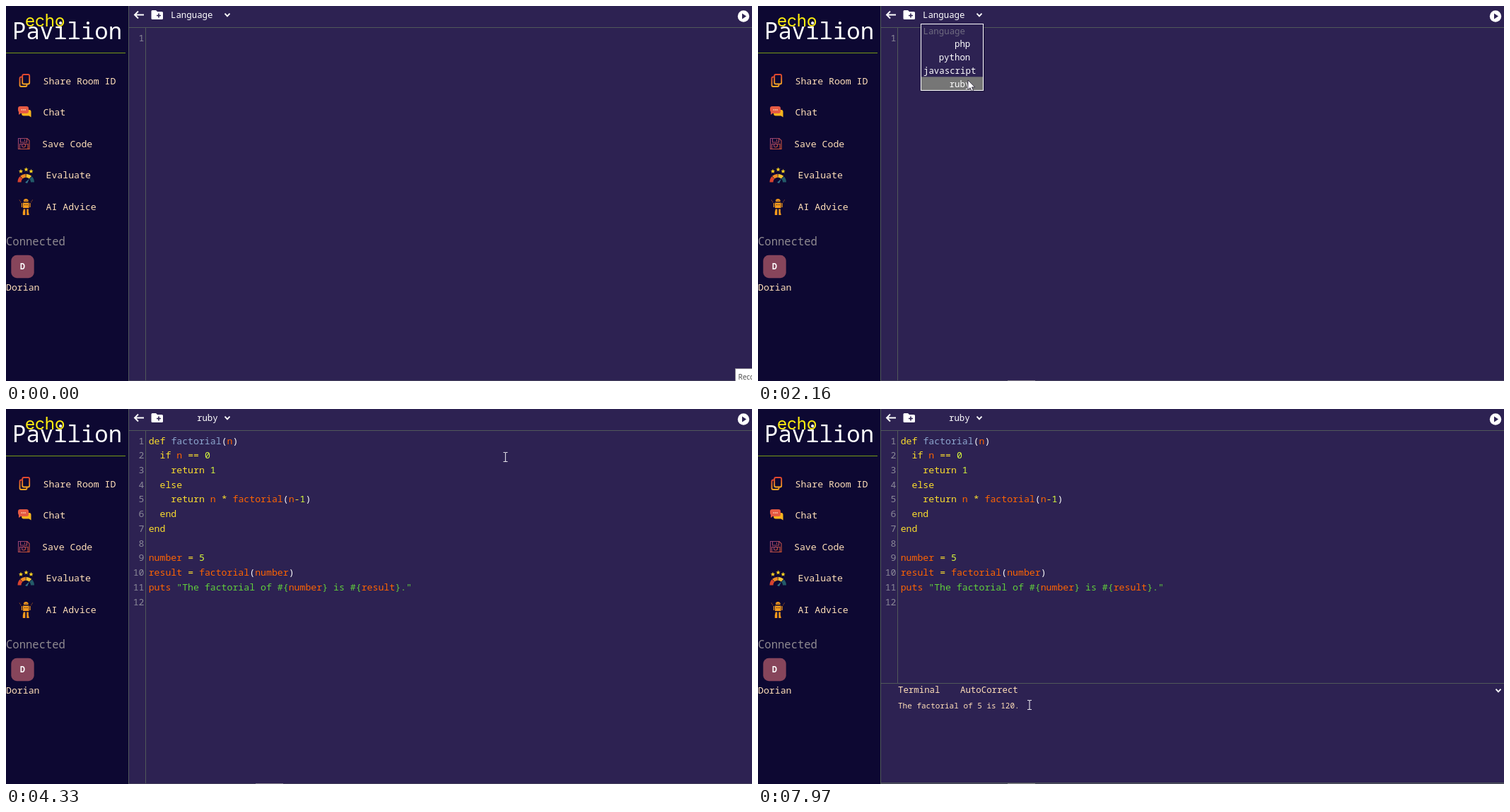
Recreate the animation shown at these times as an HTML page. Size 1055 px wide and 531 px high, loop 8 s.

```html
<!DOCTYPE html>
<html lang="en">
<head>
<meta charset="utf-8">
<title>Code room</title>
<style>
html, body { margin: 0; width: 100%; height: 100%; overflow: hidden; background: #2d2252; }
svg { display: block; width: 100vw; height: 100vh; }
text { font: 500 13.2px "Noto Sans Mono", "DejaVu Sans Mono", monospace; white-space: pre; }
.menu { fill: #ffdfb8; }
.ui { font-size: 12.4px; fill: #fff; }
.num { fill: #8b8998; text-anchor: end; }
.k { fill: #fbde2d; } .d { fill: #8da6ce; } .v { fill: #ff6400; }
.n { fill: #d8fa3c; } .s { fill: #61ce3c; } .w { fill: #f8f8f8; }
.rule { stroke: #50585a; }
</style>
</head>
<body>
<svg viewBox="0 0 1055 531" preserveAspectRatio="none">
  <defs>
    <linearGradient id="warm" x1="0" y1="0" x2="0" y2="1">
      <stop offset="0" stop-color="#e2452f"/><stop offset="1" stop-color="#f5a623"/>
    </linearGradient>
    <linearGradient id="dusk" x1="0" y1="0" x2="1" y2="1">
      <stop offset="0" stop-color="#8d3f78"/><stop offset="1" stop-color="#d2542c"/>
    </linearGradient>
    <path id="star" d="M0-3.2 .9-1.1 3.1-1 1.4.5 2 2.7 0 1.4-2 2.7-1.4.5-3.1-1-.9-1.1Z"/>
    <path id="chevron" d="M-3.5-1.8 0 1.8 3.5-1.8" fill="none" stroke="#fff" stroke-width="1.9"/>
  </defs>

  <rect width="1055" height="531" fill="#2d2252"/>
  <rect width="173" height="531" fill="#0d0832"/>
  <path class="rule" d="M173.5 0V531M174 30.5H1055"/>
  <path d="M174 530.5H1055" stroke="#45415c"/>
  <path id="gutter" class="rule"/>
  <path d="M0 66.5H169" stroke="#769a16"/>

  <text x="9" y="47" style="font-size:32.3px;font-weight:400" fill="#fff">Pavilion</text>
  <text x="27" y="29" style="font:24px Inter,sans-serif" fill="#ffee10">echo</text>

  <g fill="none" stroke="url(#warm)" stroke-width="1.8">
    <rect x="23.2" y="97" width="10" height="13.5" rx="2"/>
    <path d="M23 100.5H21.5Q19.5 100.5 19.5 102.5V112Q19.5 114 21.5 114H27.5Q29.5 114 29.5 112V111"/>
  </g>
  <path d="M23 147H33Q35.500 147 35.500 150V157.500L32.500 155.500H25Q22 155.500 22 152Z" fill="#f7b51d"/>
  <path d="M20 142H29Q32 142 32 145V149Q32 152 29 152H21L18 154V150Q17 149 17 147V145Q17 142 20 142Z" fill="#e65a43"/>
  <path d="M21.500 147H28" stroke="#fbd0b0" stroke-width="1.600" stroke-dasharray="1.6 .8"/>
  <g fill="none" stroke="url(#dusk)" stroke-width="1.1">
    <path d="M17.500 187.500H30L33 190.500V202.500H17.500ZM20.500 187.500V193H29.500V187.500M26.500 189V191.500M19.500 202V195.500H31V202"/>
    <circle cx="25" cy="197.500" r="2.500"/><path d="M22 201H28"/>
  </g>
  <g fill="#f9cf22">
    <use href="#star" x="21" y="234"/><use href="#star" x="28.500" y="231.500"/><use href="#star" x="35.500" y="234"/>
  </g>
  <g fill="none" stroke-width="5">
    <path d="M19 249.500A9.300 9.300 0 0 1 21.500 243" stroke="#d8432f"/>
    <path d="M21.800 242.700A9.300 9.300 0 0 1 27.800 240.200" stroke="#f08a24"/>
    <path d="M28.500 240.200A9.300 9.300 0 0 1 34.500 242.700" stroke="#f4c430"/>
    <path d="M35 243.100A9.300 9.300 0 0 1 37.500 249.500" stroke="#235a68"/>
  </g>
  <path d="M27 250 33 244.500 30 251Z" fill="#34758a"/>
  <g fill="#f59a1c">
    <path d="M25 277V275.500Q25 273 28.200 273T31.500 275.500V277ZM24 278.500H32.500V286H24ZM24.800 287.500H27.300V296H23.800V292ZM29.300 287.500H31.800V292L32.800 296H29.300Z"/>
    <path d="M22.500 279V285M34 279V285" stroke="#f59a1c" stroke-width="1.200"/>
    <path d="M19 274.500 21 278M37.500 274.500 35.500 278" stroke="#a8561c" stroke-dasharray="1.5 1"/>
  </g>
  <path d="M26 281.500H27.500M29 281.500H30.500M26.500 275.500H27.500M29 275.500H30" stroke="#302030" stroke-width="1.200"/>
  <g id="menu"></g>

  <text x="0" y="339" style="font-size:15.55px;font-weight:400" fill="#8f8a90">Connected</text>
  <rect x="7.300" y="352.800" width="32.400" height="32.400" rx="8" fill="#87455b"/>
  <text x="23.500" y="373" text-anchor="middle" style="font-size:11.5px;font-weight:600" fill="#fff">D</text>
  <text class="menu" x="0" y="403">Dorian</text>

  <path d="M195 12.500H182.500M187 7.500 182 12.500 187 17.500" fill="none" stroke="#fff" stroke-width="1.900"/>
  <path d="M207 6H212L214 8H220.500Q222 8 222 9.500V17.500Q222 19 220.500 19H207Q205.500 19 205.500 17.500V7.500Q205.500 6 207 6Z" fill="#fff"/>
  <path d="M216 10.500V16.500M213 13.500H219" stroke="#2d2252" stroke-width="1.600"/>
  <rect id="focus" x="228.500" y="1.500" width="91.500" height="21.500" rx="3" fill="none" stroke="#fff" stroke-width="1.200"/>
  <text id="lang" class="ui" y="17"></text>
  <use href="#chevron" x="313" y="12.500"/>
  <circle cx="1043" cy="14.500" r="8.200" fill="#fff"/>
  <path d="M1041 10.500 1047 14.500 1041 18.500Z" fill="#2d2252"/>

  <g id="code"></g>
  <text class="num" x="195.500" y="49.500">1</text>
  <path id="caret" d="M201.500 0V21" stroke="#b5b3bd"/>

  <g id="panel">
    <path class="rule" d="M174 388.500H1055M174 529.500H1055"/>
    <text class="menu" style="font-size:12.4px" x="198" y="402">Terminal</text>
    <text class="menu" style="font-size:12.4px" x="286" y="402">AutoCorrect</text>
    <text class="menu" style="font-size:11px" x="198" y="424">The factorial of 5 is 120.</text>
    <use href="#chevron" x="1047" y="398.500"/>
  </g>

  <g id="list">
    <rect x="229" y="27" width="92" height="95" fill="#1b1437" opacity=".35"/>
    <rect x="230.500" y="25.500" width="88" height="94" fill="#2d2252" stroke="#fff"/>
    <rect id="hover" x="231" width="87" height="18.700" fill="#767676"/>
    <g id="options"></g>
  </g>

  <g id="tip">
    <rect x="1031.500" y="513.500" width="25" height="19" fill="#fff" stroke="#8c8a94"/>
    <text x="1035.500" y="528.500" style="font:10px 'Open Sans',sans-serif" fill="#444">Reco</text>
  </g>
  <rect id="bar" y="530" width="39" height="1" fill="#8a8790"/>

  <g id="pointer">
    <path id="arrow" d="M0 0V13.500L3.100 10.700 5.200 15.500 7.500 14.500 5.400 9.900H9.600Z" fill="#fff" stroke="#17112c" stroke-width=".7"/>
    <path id="beam" d="M-3-6.500H-1Q0-6.500 0-5.500 0-6.500 1-6.500H3M0-6V6M-3 6.500H-1Q0 6.500 0 5.500 0 6.500 1 6.500H3" fill="none" stroke="#e3e1e8" stroke-width="1.100"/>
    <path id="hand" d="M-1.500 1.500Q0-1 1.500 1.500V6.500Q3 5.500 4 7 5.500 6.200 6.300 7.700 8 7.500 8 9.500V13Q8 15 6.500 18H-1L-5 11.500Q-4.500 9.500-1.500 12Z" fill="#fff" stroke="#17112c" stroke-width=".8"/>
  </g>
</svg>
<script>
const LOOP = 8000, ROW = 20.73, OPT = 18.7;
const $ = id => document.getElementById(id);
const lerp = (a, b, p) => a + (b - a) * p;
const show = (id, on) => $(id).setAttribute('display', on ? 'inline' : 'none');

function addText(parent, cls, x, y, str) {
  const el = document.createElementNS('http://www.w3.org/2000/svg', 'text');
  el.setAttribute('class', cls);
  el.setAttribute('x', x);
  el.setAttribute('y', y);
  el.textContent = str;
  parent.append(el);
  return el;
}

[['Share Room ID', 52.5], ['Chat', 52.5], ['Save Code', 51], ['Evaluate', 56.5], ['AI Advice', 56.5]]
  .forEach(([label, x], i) => addText($('menu'), 'menu', x, 110.8 + 44.5 * i, label));

[['Language', 233.5], ['php', 278], ['python', 255.7], ['javascript', 234], ['ruby', 270.7]]
  .forEach(([label, x], i) => {
    const el = addText($('options'), 'ui', x, 39.7 + OPT * i, label);
    if (!i) el.style.fill = '#6f6b80';
  });

// Each token is one class letter followed by its text.
const CODE = [
  'kdef |dfactorial|w(|vn|w)',
  'k  if |vn |k== |n0',
  'k    return |n1',
  'k  else',
  'k    return |vn |k* |vfactorial|w(|vn|k-|n1|w)',
  'k  end',
  'kend',
  '',
  'vnumber |k= |n5',
  'vresult |k= |vfactorial|w(|vnumber|w)',
  'vputs |s"The factorial of #{|vnumber|s} is #{|vresult|s}."',
  ''
];
CODE.forEach((line, i) => {
  const y = 49.5 + ROW * i;
  if (i) addText($('code'), 'num', 195.5, y, i + 1);
  let col = 0;
  for (const tok of line.split('|')) {
    if (!tok) continue;
    addText($('code'), tok[0], 201.7 + col * 7.92, y, tok.slice(1));
    col += tok.length - 1;
  }
});

// Pointer path: time, x, y
const PATH = [
  [60, 1040, 522], [840, 308, 69], [890, 308, 60], [1220, 307, 12], [1350, 307, 12],
  [1670, 304, 28], [1850, 298, 59], [2160, 297, 105], [2340, 297, 105], [2670, 296.5, 71.5],
  [2800, 324, 62], [3790, 324, 62], [4330, 705.5, 68], [4590, 930, 62], [4640, 945, 60],
  [5170, 1041, 22], [5490, 1041, 22], [5540, 1041, 20], [6100, 1041, 20], [6850, 552, 230],
  [6920, 545, 240], [7500, 290, 412], [7710, 377, 414], [7780, 377, 414], [7970, 384, 419]
];

function pointerAt(t) {
  let i = PATH.findIndex(k => k[0] > t);
  if (i < 0) return PATH[PATH.length - 1].slice(1);
  if (i === 0) i = 1;
  const [a, b] = [PATH[i - 1], PATH[i]];
  const p = Math.max(0, (t - a[0]) / (b[0] - a[0]));
  return [lerp(a[1], b[1], p), lerp(a[2], b[2], p)];
}

function draw(t) {
  const [x, y] = pointerAt(t);
  const open = t >= 1400 && t < 2340;
  const chosen = t >= 2340, focused = chosen && t < 2700;
  const pasted = t >= 3430, ran = t >= 6100;

  show('tip', t < 60);
  show('bar', t >= 400);
  $('bar').setAttribute('x', t < 1400 ? 472 : 353);
  $('lang').textContent = chosen ? 'ruby' : 'Language';
  $('lang').setAttribute('x', chosen ? 270 : 233);
  show('focus', focused);

  show('list', open);
  const row = Math.floor((y - 25.5) / OPT);
  show('hover', open && row >= 1);
  $('hover').setAttribute('y', 25.5 + OPT * row);

  show('code', pasted);
  show('panel', ran);
  $('gutter').setAttribute('d', `M197.500 31V${ran ? 388 : 530}`);

  const since = t - (pasted ? 3430 : 2700);
  show('caret', since >= 0 && t < 5490 && Math.floor(since / 530) % 2 === 0);
  $('caret').setAttribute('transform', `translate(0 ${pasted ? 35 + ROW * 11 : 35})`);

  const hand = x > 1030 && y < 32;
  const arrow = !hand && (open || focused || y < 31);
  show('pointer', t >= 60);
  show('hand', hand);
  show('arrow', arrow);
  show('beam', !hand && !arrow);
  $('pointer').setAttribute('transform', `translate(${x} ${y})`);
}

const start = performance.now();
function tick() {
  draw((performance.now() - start) % LOOP);
  requestAnimationFrame(tick);
}
tick();
</script>
</body>
</html>
```
